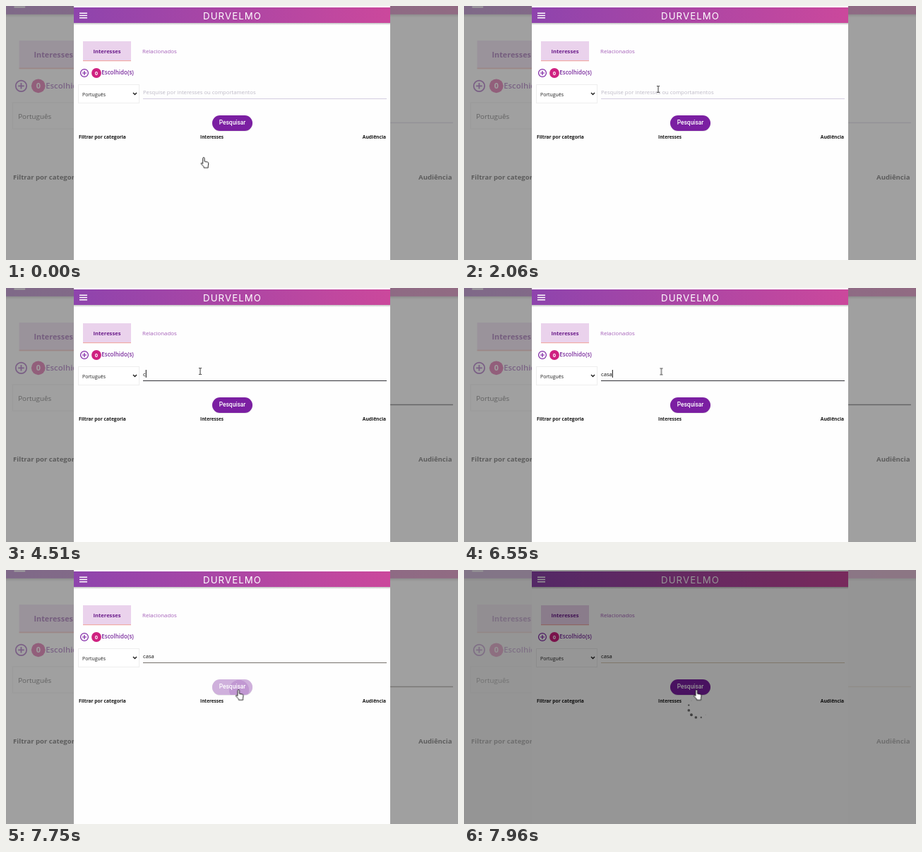
Animation, 640 px wide and 360 px high, one loop 8000 ms. Source, as an HTML page:

```html
<!DOCTYPE html>
<html lang="pt">
<head>
<meta charset="utf-8">
<title>Pesquisa de interesses</title>
<style>
html, body { margin: 0; width: 100%; height: 100%; overflow: hidden; background: #a0a0a0; }
svg { display: block; width: 640px; height: 360px; }
text { font-family: "Open Sans", "Noto Sans", sans-serif; }
.bold { font-weight: 700; }
.head { font-weight: 700; font-size: 6.7px; fill: #161616; }
.field { font-size: 7.67px; }

/* One loop lasts 8 s: 1% is 80 ms */
.line, .caret, .hint, .typed, .btn, .ripple, .shade, .veil, .pos, .hand, .beam, .spin {
  animation: 8s linear infinite;
}
.line { animation-name: line; }
@keyframes line {
  0%, 31.25% { fill: #d3cde0; }
  35.25%, 95.9% { fill: #303036; animation-timing-function: ease-out; }
  99.5%, 100% { fill: #d8c9b4; }
}
.hint { animation-name: hint; animation-timing-function: step-end; }
@keyframes hint { 0% { opacity: 1; } 56.25%, 100% { opacity: 0; } }

.typed { animation-timing-function: step-end; }
.k1 { animation-name: k1; }
.k2 { animation-name: k2; }
.k3 { animation-name: k3; }
.k4 { animation-name: k4; }
@keyframes k1 { 0% { fill-opacity: 0; } 56.25%, 100% { fill-opacity: 1; } }
@keyframes k2 { 0% { fill-opacity: 0; } 57.65%, 100% { fill-opacity: 1; } }
@keyframes k3 { 0% { fill-opacity: 0; } 60.2%, 100% { fill-opacity: 1; } }
@keyframes k4 { 0% { fill-opacity: 0; } 62.8%, 100% { fill-opacity: 1; } }

.caret { animation-name: blink, advance; animation-timing-function: step-end; }
@keyframes blink {
  0% { opacity: 0; }
  31.3% { opacity: 1; }
  37.8% { opacity: 0; }
  44.7% { opacity: 1; }
  51.2% { opacity: 0; }
  56.25% { opacity: 1; }
  69.3% { opacity: 0; }
  76.2% { opacity: 1; }
  82.8% { opacity: 0; }
  89.3% { opacity: 1; }
  95.9%, 100% { opacity: 0; }
}
@keyframes advance {
  0% { transform: translateX(0); }
  56.25% { transform: translateX(3.8px); }
  57.65% { transform: translateX(8px); }
  60.2% { transform: translateX(11.7px); }
  62.8%, 100% { transform: translateX(15.8px); }
}

.btn { animation-name: btn; }
@keyframes btn {
  0%, 86% { fill: #7b1fa2; }
  89.6%, 97.3% { fill: #cfb0dc; }
  99.4%, 100% { fill: #7b1fa2; }
}
.ripple { animation-name: ripple; transform-box: fill-box; transform-origin: center; }
@keyframes ripple {
  0%, 95.9% { opacity: 0; transform: scale(.1); }
  96% { opacity: .16; transform: scale(.2); }
  97.4% { opacity: .16; transform: scale(1); }
  99.4%, 100% { opacity: 0; transform: scale(1.8); }
}

.shade, .spin { animation-name: load; animation-timing-function: step-end; }
@keyframes load { 0% { opacity: 0; } 97.25%, 100% { opacity: 1; } }
.veil { animation-name: veil; animation-timing-function: step-end; }
@keyframes veil {
  0% { fill: rgba(121, 121, 121, .71); }
  97.25%, 100% { fill: rgba(128, 128, 128, .83); }
}

.pos { animation-name: pos; animation-timing-function: ease-in-out; }
@keyframes pos {
  0%, 14.5% { transform: translate(280px, 215.3px); }
  16.75%, 19.3% { transform: translate(270px, 168px); }
  23.2% { transform: translate(272px, 107.5px); }
  25.7%, 81.4% { transform: translate(275px, 118px); animation-timing-function: linear; }
  81.85% { transform: translate(279px, 118px); animation-timing-function: ease-out; }
  89.6%, 100% { transform: translate(329.3px, 170.3px); }
}
.hand, .beam { animation-timing-function: step-end; }
.hand { animation-name: hand; }
.beam { animation-name: beam; }
@keyframes hand { 0% { opacity: 1; } 21.3% { opacity: 0; } 83.2%, 100% { opacity: 1; } }
@keyframes beam { 0% { opacity: 0; } 21.3% { opacity: 1; } 83.2%, 100% { opacity: 0; } }

.dot { animation: dot 1s linear infinite; transform-box: fill-box; transform-origin: center; }
@keyframes dot {
  0%, 58%, 100% { transform: scale(0); }
  10% { transform: scale(.5); }
  20% { transform: scale(.87); }
  29% { transform: scale(1); }
  38% { transform: scale(.87); }
  48% { transform: scale(.5); }
}
</style>
</head>
<body>
<svg viewBox="0 0 640 360">
  <defs>
    <linearGradient id="bar">
      <stop offset="0" stop-color="#8e44ad"/>
      <stop offset="1" stop-color="#cb489c"/>
    </linearGradient>
    <linearGradient id="drop" x2="0" y2="1">
      <stop offset="0" stop-opacity=".25"/>
      <stop offset="1" stop-opacity="0"/>
    </linearGradient>
    <clipPath id="pill"><rect x="292" y="155" width="57" height="22" rx="11"/></clipPath>
  </defs>

  <g id="back" transform="matrix(1.4286 0 0 1.4286 -137.1 -22.4)"></g>
  <rect class="veil" width="640" height="360"/>

  <g id="page">
    <rect x="96" y="-10" width="448" height="380" fill="#fefefe"/>
    <rect x="96" y="2" width="448" height="22" fill="url(#bar)"/>
    <rect x="96" y="24" width="448" height="3" fill="url(#drop)"/>
    <path d="M104 10.3h11M104 13.5h11M104 16.7h11" stroke="#fff" stroke-width="1.4"/>
    <text x="320.5" y="18.7" text-anchor="middle" fill="#fff" font-size="13.2" letter-spacing="1.1" style="font-family:Inter,sans-serif">DURVELMO</text>

    <rect x="109" y="50" width="68" height="28" fill="#ead2ec"/>
    <rect x="109" y="77" width="68" height="1.2" fill="#f0aaa6"/>
    <text class="bold" x="143" y="67" text-anchor="middle" font-size="7.6" fill="#6a1b8a">Interesses</text>
    <text x="193" y="67" font-size="7.9" fill="#a45fb8">Relacionados</text>

    <g fill="none" stroke="#7b1fa2" stroke-width="1.2">
      <circle cx="111" cy="95" r="5.4"/>
      <path d="M108 95h6M111 92v6"/>
    </g>
    <circle cx="128" cy="95" r="6.9" fill="#cf2180"/>
    <text class="bold" x="128" y="97.8" text-anchor="middle" font-size="7.6" fill="#fff">0</text>
    <text x="135.3" y="97.4" font-size="8" font-weight="600" fill="#7b2d9e">Escolhido(s)</text>

    <rect x="102.5" y="111.5" width="86" height="26" fill="#fff" stroke="#eee"/>
    <text x="108" y="127.8" font-size="6.9" fill="#222">Português</text>
    <path d="M180 123l2.5 2.5 2.5-2.5" fill="none" stroke="#222" stroke-width="1.5"/>

    <text class="field hint" x="194" y="125.2" fill="#bdb9c6">Pesquise por interesses ou comportamentos</text>
    <text class="field" x="194" y="125.2" fill="#111"><tspan class="typed k1">c</tspan><tspan class="typed k2">a</tspan><tspan class="typed k3">s</tspan><tspan class="typed k4">a</tspan></text>
    <rect class="caret" x="194" y="116" width="1" height="11" fill="#111"/>
    <rect class="line" x="194" y="131" width="345" height="1"/>

    <rect x="292" y="155.6" width="57" height="22" rx="11" opacity=".15"/>
    <rect class="btn" x="292" y="155" width="57" height="22" rx="11"/>
    <g clip-path="url(#pill)"><circle class="ripple" cx="330" cy="170" r="20" fill="#7b1fa2"/></g>
    <text x="320.5" y="168.2" text-anchor="middle" font-size="8.4" font-weight="500" fill="#fff" style="font-family:Roboto,sans-serif">Pesquisar</text>

    <text class="head" x="103" y="188.2">Filtrar por categoria</text>
    <text class="head" x="275" y="188.2" style="font-size:6.45px">Interesses</text>
    <text class="head" x="538" y="188.2" text-anchor="end">Audiência</text>
  </g>

  <rect class="shade" x="96" width="448" height="360" fill="rgba(0,0,0,.41)"/>
  <g id="spin" class="spin" fill="#3c3c3c"></g>

  <g class="pos">
    <path class="hand" d="M-1.3 8.2V.6a1.2 1.2 0 0 1 2.4 0V5l4.2.9q1.6.4 1.5 2L6.2 11.5V14H.2V12.5L-3.8 8.6q-.4-1.4.9-1.3z" fill="#fff" stroke="#111" stroke-width=".9" stroke-linejoin="round"/>
    <path class="beam" d="M-2-4.5h1.4l.6.5.6-.5H2M-2 4.5h1.4L0 4l.6.5H2M0-4V4" fill="none" stroke="#222" stroke-width=".9"/>
  </g>
</svg>
<script>
const $ = id => document.getElementById(id);

// Enlarged copy of the page behind the veil
$('back').append(...$('page').cloneNode(true).children);

// Ring of twelve dots, each swelling as the head passes it
for (let i = 0; i < 12; i++) {
  const deg = 15 + i * 30, rad = deg * Math.PI / 180;
  const dot = document.createElementNS('http://www.w3.org/2000/svg', 'circle');
  dot.setAttribute('class', 'dot');
  dot.setAttribute('cx', 332 + 14.2 * Math.cos(rad));
  dot.setAttribute('cy', 195.2 + 14.2 * Math.sin(rad));
  dot.setAttribute('r', 1.9);
  dot.style.animationDelay = (deg - 150) / 360 - 1.29 + 's';
  $('spin').append(dot);
}
</script>
</body>
</html>
```
